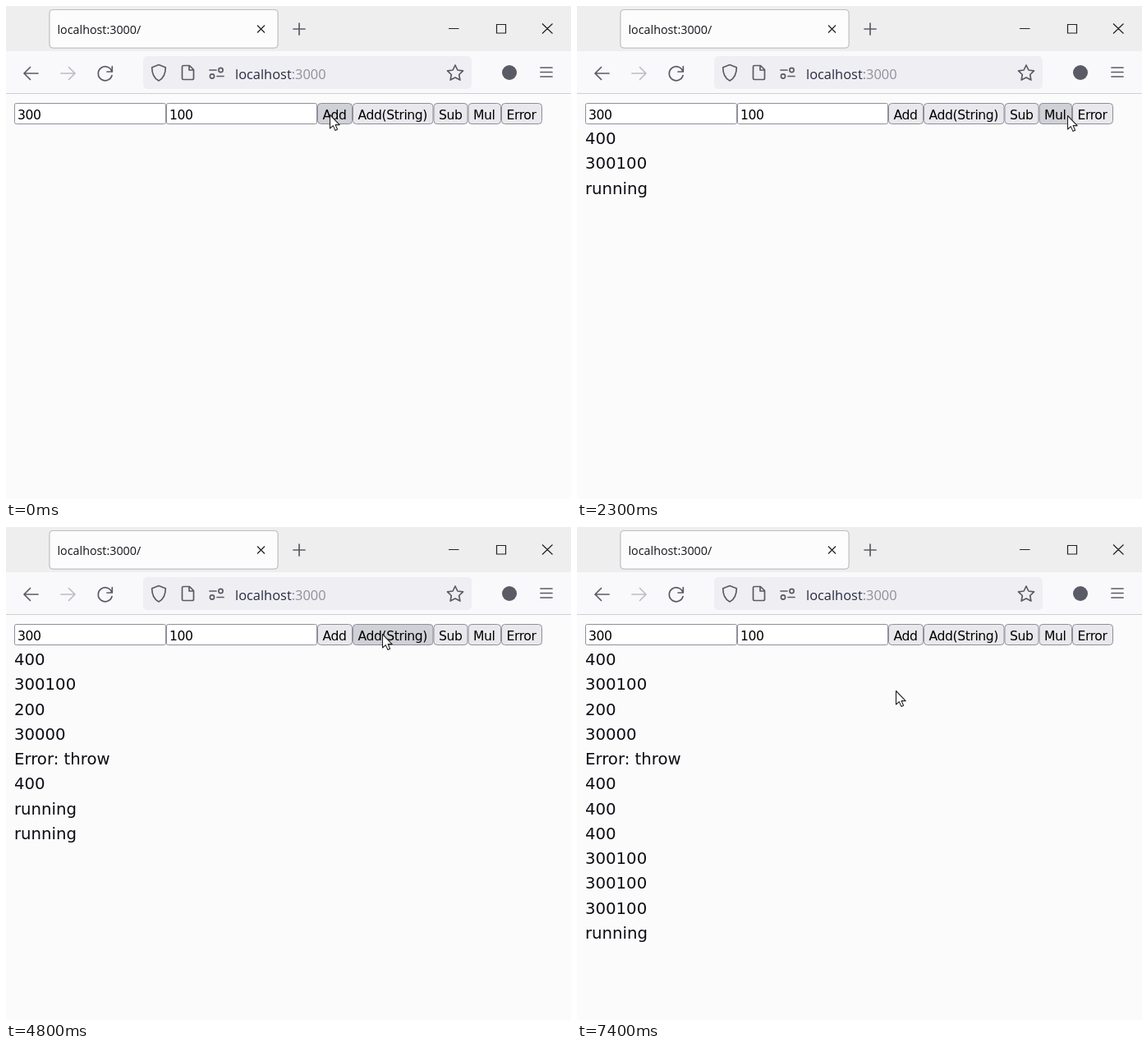
Recreate the animation shown at these times as an HTML page. Size 688 px wide and 600 px high, loop 7.9 s.

```html
<!DOCTYPE html>
<html lang="en">
<head>
<meta charset="utf-8">
<title>Queue demo</title>
<style>
html, body { margin: 0; width: 100%; height: 100%; overflow: hidden; background: #fbfbfb; }
svg { display: block; width: 688px; height: 600px; }
text { white-space: pre; }
.ui { font-family: "Open Sans", "Noto Sans", sans-serif; }
.form { font: 15.6px "DejaVu Sans", sans-serif; letter-spacing: -.4px; fill: #000; }
.row { font: 19.7px "DejaVu Sans", sans-serif; fill: #0c0c14; }
.icon { fill: none; stroke: #5b5b66; stroke-width: 1.7; stroke-linecap: round; stroke-linejoin: round; }
.thin { fill: none; stroke: #222; stroke-width: 1.2; }
</style>
</head>
<body>
<svg id="stage" viewBox="0 0 688 600" xmlns="http://www.w3.org/2000/svg">
  <rect width="688" height="600" fill="#fbfbfb"/>
  <rect width="688" height="55" fill="#eeeeee"/>
  <rect y="55" width="688" height="51" fill="#f9f9fb"/>
  <rect y="106" width="688" height="1" fill="#cfcfd4"/>

  <rect x="52" y="4" width="280" height="48" rx="5" fill="#dcdce0"/>
  <rect x="53" y="4.5" width="278" height="46.5" rx="4" fill="#fcfcfd" stroke="#bebec4"/>
  <text class="ui" x="62.5" y="34" font-size="14.3" fill="#15141a">localhost:3000/</text>
  <path class="thin" stroke-width="1.4" d="M306 23.5l9 9m0-9l-9 9"/>
  <path class="icon" stroke-width="1.5" d="M350 28h14M357 21v14"/>
  <path class="thin" d="M539 27.5h12.5M597.5 22.5h11v10.5h-11zM653 21.5l12.5 12M665.500 21.500l-12.500 12"/>

  <path class="icon" d="M39 82H22m7.500-7.500L22 82l7.500 7.500"/>
  <path class="icon" style="stroke:#bdbdc4" d="M67 82h17m-7.500-7.500L84 82l-7.500 7.500"/>
  <path class="icon" d="M129 80A8.500 8.500 0 1 0 129 84.500M129.300 73.500V80H123"/>

  <rect x="167" y="61" width="400" height="40" rx="5" fill="#efeff3"/>
  <path class="icon" d="M186 71.500l8.300 3.200c0 7.500-2 13-8.300 16.300c-6.300-3.300-8.300-8.800-8.300-16.300z"/>
  <path class="icon" d="M216 72.500h7.500l5 5v10.500a1.500 1.500 0 0 1-1.500 1.500h-11a1.500 1.500 0 0 1-1.500-1.500v-14a1.500 1.500 0 0 1 1.500-1.500zM223 73v5h5"/>
  <path class="icon" d="M248 78h8M257 85.500h8"/>
  <circle class="icon" cx="261.500" cy="78" r="2.600"/>
  <circle class="icon" cx="251" cy="85.500" r="2.600"/>
  <text class="ui" x="279" y="88.500" font-size="16.400" fill="#292a42">localhost<tspan fill="#8f8f9b">:3000</tspan></text>
  <path id="star" class="icon"/>
  <circle cx="613" cy="81" r="9" fill="#5b5b66"/>
  <path class="icon" d="M651 75h14M651 80.500h14M651 86h14"/>

  <g id="form"></g>
  <g id="rows"></g>
  <path id="cursor" d="M.5 .5V17L4.300 13.600L6.900 19.400L9.600 18.200L7.100 12.600H12.200Z" fill="#fff" stroke="#222" stroke-width="1.100" stroke-linejoin="round"/>
</svg>
<script>
const LOOP = 7900, STEP = 100;
const $ = id => document.getElementById(id);

function add(parent, tag, attrs, text) {
  const el = document.createElementNS("http://www.w3.org/2000/svg", tag);
  for (const k in attrs) el.setAttribute(k, attrs[k]);
  if (text) el.textContent = text;
  parent.appendChild(el);
  return el;
}

const star = [];
for (let i = 0; i < 10; i++) {
  const r = i % 2 ? 4.9 : 10, a = (i / 5 - 0.5) * Math.PI;
  star.push((547 + r * Math.cos(a)).toFixed(1) + " " + (82 + r * Math.sin(a)).toFixed(1));
}
$("star").setAttribute("d", "M" + star.join("L") + "Z");

function box(x, w, rx, fill) {
  return add($("form"), "rect", {
    x: x + 0.5, y: 118.5, width: w - 1, height: 25, rx, fill, stroke: "#8f8f9d"
  });
}
function label(x, text) {
  add($("form"), "text", { x, y: 138, class: "form" }, text);
}

[[10, 185, "300"], [195, 184, "100"]].forEach(([x, w, text]) => {
  box(x, w, 2, "#fff");
  label(x + 4, text);
});

const buttons = [
  [379, 43, "Add"], [422, 98.5, "Add(String)"], [520.5, 42, "Sub"],
  [562.5, 40.5, "Mul"], [603, 50, "Error"]
].map(([x, w, text]) => {
  const el = box(x, w, 4, "#e9e9ed");
  label(x + 6.5, text);
  return { x, w, el };
});

// result, time queued, time finished
const jobs = [
  ["400", 300, 900],
  ["300100", 1100, 1700],
  ["200", 1800, 2400],
  ["30000", 2500, 3100],
  ["Error: throw", 3400, 4000],
  ["400", 4200, 4700],
  ["400", 4400, 5200],
  ["400", 4600, 5700],
  ["300100", 5000, 6300],
  ["300100", 5200, 6800],
  ["300100", 5400, 7400],
  ["300100", 5800, LOOP]
].map(([result, start, end], i) => ({
  result, start, end,
  el: add($("rows"), "text", { x: 10, y: 168 + 30.25 * i, class: "row" })
}));

// time, x, y of the pointer tip
const path = [
  [0, 394, 132], [400, 394, 132], [900, 468, 134], [1100, 470, 135],
  [1400, 524, 139], [1600, 540, 137], [1900, 541, 137], [2300, 597, 133],
  [2500, 591, 133], [2600, 592, 133], [3000, 627, 133], [3400, 628, 133],
  [3700, 464, 125], [4000, 402, 131], [4600, 402, 131], [4800, 458, 130],
  [5600, 460, 132], [5900, 460, 133], [6400, 388, 199], [LOOP, 388, 199]
];

function pointer(t) {
  let i = 1;
  while (i < path.length - 1 && path[i][0] <= t) i++;
  const [t0, x0, y0] = path[i - 1], [t1, x1, y1] = path[i];
  const p = Math.min(1, (t - t0) / (t1 - t0));
  const k = p * p * (3 - 2 * p);
  return [x0 + (x1 - x0) * k, y0 + (y1 - y0) * k];
}

function draw(time) {
  const t = Math.floor((time % LOOP) / STEP) * STEP;
  const [x, y] = pointer(t);
  $("cursor").setAttribute("transform", `translate(${Math.round(x)} ${Math.round(y)})`);
  for (const b of buttons) {
    const over = y >= 118 && y < 144 && x >= b.x && x < b.x + b.w;
    b.el.setAttribute("fill", over ? "#d0d0d7" : "#e9e9ed");
  }
  for (const j of jobs) {
    j.el.textContent = t < j.start ? "" : t < j.end ? "running" : j.result;
  }
}

const begin = performance.now();
function tick() {
  draw(performance.now() - begin);
  requestAnimationFrame(tick);
}
tick();
</script>
</body>
</html>
```
